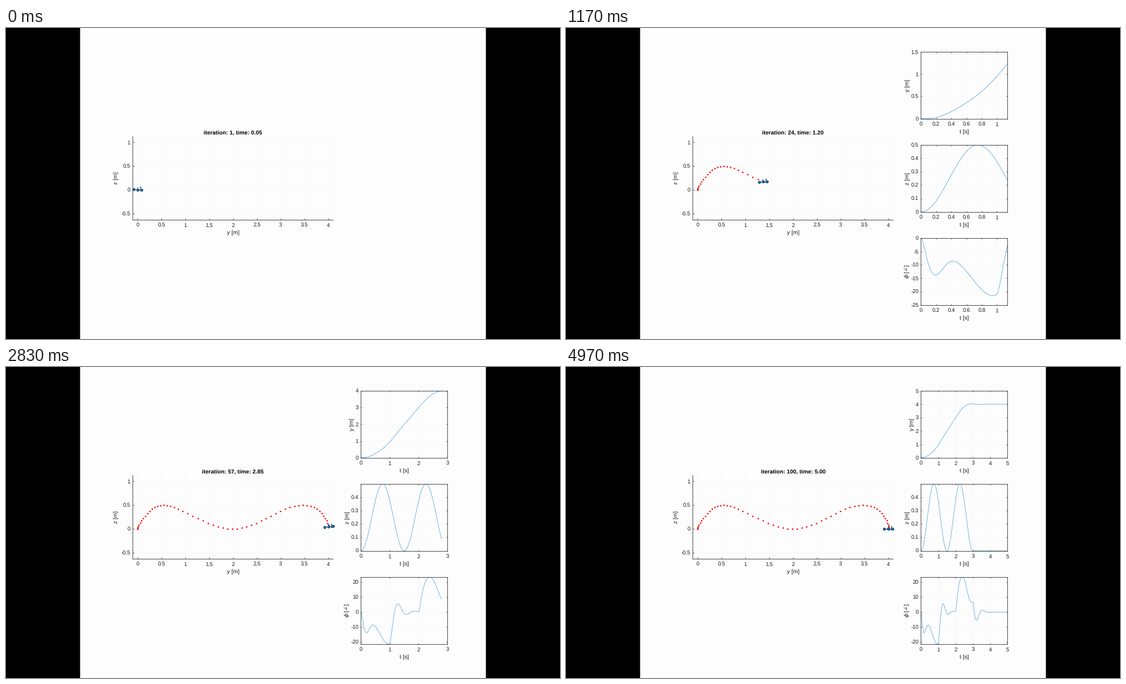
A matplotlib script for the animation above (5 s loop, 998 by 561 pixels).

```python
import math

import matplotlib.pyplot as plt
import numpy as np
from matplotlib.animation import FuncAnimation
from matplotlib.patches import Rectangle

W, H, DPI = 998, 561, 64
PX = 72 / DPI  # points per pixel
FRAMES, LOOP = 150, 5000
PAPER, INK, GRID, BLUE = '#fdfdfd', '#1a1a1a', '#f7f7f8', '#0072bd'
ARM, MAST = 0.086, 0.05
STEP = 0.05

plt.rcParams['font.family'] = 'Liberation Sans'
plt.rcParams['mathtext.fontset'] = 'dejavuserif'
plt.rcParams['text.hinting'] = 'none'


def reference(t):
    """Speed up, cruise, brake: position, velocity, acceleration in y."""
    if t < 1:
        return t * t, 2 * t, 2
    if t < 2:
        return 2 * t - 1, 2, 0
    rest = max(3 - t, 0)
    return 4 - rest * rest, 2 * rest, -2 if rest else 0


def fly(duration=5, dt=0.001, every=10):
    """Planar quadrotor: PD position loop around a PD roll loop."""
    g, kp, kv = 9.81, 12, 8.9
    kp_roll, kv_roll = 550, 52
    omega, lift = 2 * math.pi / 1.5, 0.25
    y = vy = roll = rate = 0.0
    log = []
    for i in range(int(duration / dt) + 1):
        t = i * dt
        if i % every == 0:
            z = lift * (1 - math.cos(omega * min(t, 3))) - 0.001 * min(t / 1.5, 1)
            log.append((t, y, z, math.degrees(roll)))
        ry, rv, ra = reference(t)
        wanted = -(ra + kv * (rv - vy) + kp * (ry - y)) / g
        thrust = g + (lift * omega ** 2 * math.cos(omega * t) if t < 3 else 0)
        rate += (kp_roll * (wanted - roll) - kv_roll * rate) * dt
        roll += rate * dt
        vy -= thrust * math.tan(roll) * dt
        y += vy * dt
    return np.array(log).T


def spacing(lo, hi, down, up):
    """Smallest 1-2-5 step that gives at most five intervals."""
    e = math.floor(math.log10(hi - lo)) - 1
    for p in range(e, e + 4):
        for m in (1, 2, 5):
            s = m * 10.0 ** p
            a, b = down(lo / s), up(hi / s)
            if b - a <= 5:
                return s, a, b


def floor(v):
    return math.floor(v + 1e-9)


def ceil(v):
    return math.ceil(v - 1e-9)


def auto_axis(lo, hi):
    """Round limits outward unless that leaves too much of the axis empty."""
    hi = max(hi, lo + 1e-5)
    s, a, b = spacing(lo, hi, floor, ceil)
    span = (b - a) * s
    below, above = (lo - a * s) / span, (b * s - hi) / span
    allowed = (0.2 if below + above < 0.35 else 0.1) - 1e-9
    low = lo if below >= allowed else a * s
    high = hi if above >= allowed else b * s
    s, a, b = spacing(low, high, ceil, floor)
    return low, high, np.arange(a, b + 1) * s


def make_axes(left, top, right, bottom, tick, xlabel, ylabel, boxed, ypad):
    ax = fig.add_axes([left / W, 1 - bottom / H, (right - left) / W, (bottom - top) / H])
    ax.set_facecolor('none')
    ax.tick_params(direction='in', length=tick * PX, width=.7 * PX, color=INK,
                   labelcolor=INK, labelsize=9.6 * PX, top=boxed, right=boxed)
    ax.tick_params(axis='x', pad=5.5 * PX)
    ax.tick_params(axis='y', pad=4.3 * PX)
    ax.grid(True, color=GRID, lw=.7 * PX)
    ax.set_axisbelow(True)
    for side, spine in ax.spines.items():
        spine.set(color=INK, linewidth=.8 * PX, visible=boxed or side in ('left', 'bottom'))
    ax.set_xlabel(xlabel, size=10.4 * PX, color=INK, labelpad=4 * PX)
    ax.set_ylabel(ylabel, size=10.4 * PX, color=INK, labelpad=ypad * PX)
    return ax


def set_axis(axis, set_lim, lo, hi):
    """Apply limits and ticks; return the shared power of ten."""
    lo, hi, ticks = auto_axis(lo, hi)
    set_lim(lo, hi)
    big = max(abs(lo), abs(hi))
    e = floor(math.log10(big)) if big < 0.01 - 1e-9 else 0
    axis.set_ticks(ticks, [f'{round(v / 10.0 ** e, 6) + 0.0:g}' for v in ticks])
    return e


fig = plt.figure(figsize=(W / DPI, H / DPI), dpi=DPI, facecolor='black')
fig.add_artist(Rectangle((133.5 / W, 0), 731 / W, 1, transform=fig.transFigure,
                         color=PAPER, lw=0, zorder=-1, snap=False))

# Flight view
SCALE = 85.9
world = make_axes(228.4, 195.4, 589.2, 346, 3.2, 'y [m]', 'z [m]', False, 5)
world.set_xlim(-0.1, 4.1)
world.set_ylim(-53.8 / SCALE, 96.8 / SCALE)
for axis, ticks in ((world.xaxis, np.arange(9) / 2), (world.yaxis, np.arange(-1, 3) / 2)):
    axis.set_ticks(ticks, [f'{v:g}' for v in ticks])
title = fig.text(409 / W, 1 - 191.8 / H, '', ha='center', va='baseline',
                 size=10.2 * PX, weight='bold', color='black')
trail, = world.plot([], [], 'o', color='red', ms=2.7 * PX, mew=0, clip_on=False)
tag = world.text(0, 0, '1', size=9.6 * PX, ha='center', va='center_baseline', zorder=3)
mast, = world.plot([], [], color=BLUE, lw=1.2 * PX, zorder=4, clip_on=False)
body, = world.plot([], [], '-o', color='#10324c', lw=.9 * PX, ms=4.4 * PX, mfc=BLUE,
                   mec='#0a3250', mew=.8 * PX, zorder=5, clip_on=False)

# State histories
T, *STATE = fly()
charts = []
for row, (label, pad) in enumerate((('y [m]', 2), ('z [m]', 2),
                                    (r'$\phi$ [$\angle$]', 0.5))):
    top = 42.8 + 168 * row
    ax = make_axes(639.4, top, 795.4, top + 121, 1.6, 't [s]', label, True, pad)
    line, = ax.plot([], [], color=BLUE, lw=.52 * PX)
    power = ax.text(0, 1.03, '', transform=ax.transAxes, size=9.6 * PX, color=INK)
    charts.append((ax, line, power))


def draw(i):
    k = i * 100 // FRAMES + 1
    title.set_text(f'iteration: {k}, time: {k * STEP:.2f}')

    y, z, roll = (v[5 * k] for v in STATE)
    c, s = math.cos(math.radians(roll)), math.sin(math.radians(roll))
    trail.set_data(STATE[0][:5 * k + 1:5], STATE[1][:5 * k + 1:5])
    body.set_data([y - ARM * c, y, y + ARM * c], [z - ARM * s, z, z + ARM * s])
    mast.set_data([y, y - MAST * s], [z, z + MAST * c])
    tag.set_position((y + 5 / SCALE, z + 2.3 / SCALE))

    # Histories trail the flight view by one control step.
    n = 5 * (k - 1)
    for (ax, line, power), values in zip(charts, STATE):
        ax.set_visible(n > 0)
        if n:
            t, v = T[:n], values[:n]
            line.set_data(t, v)
            set_axis(ax.xaxis, ax.set_xlim, 0, t[-1])
            e = set_axis(ax.yaxis, ax.set_ylim, v.min(), v.max())
            power.set_text(rf'$\times\mathregular{{10^{{{e}}}}}$' if e else '')
    return []


anim = FuncAnimation(fig, draw, frames=FRAMES, interval=LOOP / FRAMES,
                     repeat=True, repeat_delay=0, blit=False)
plt.show()
```
